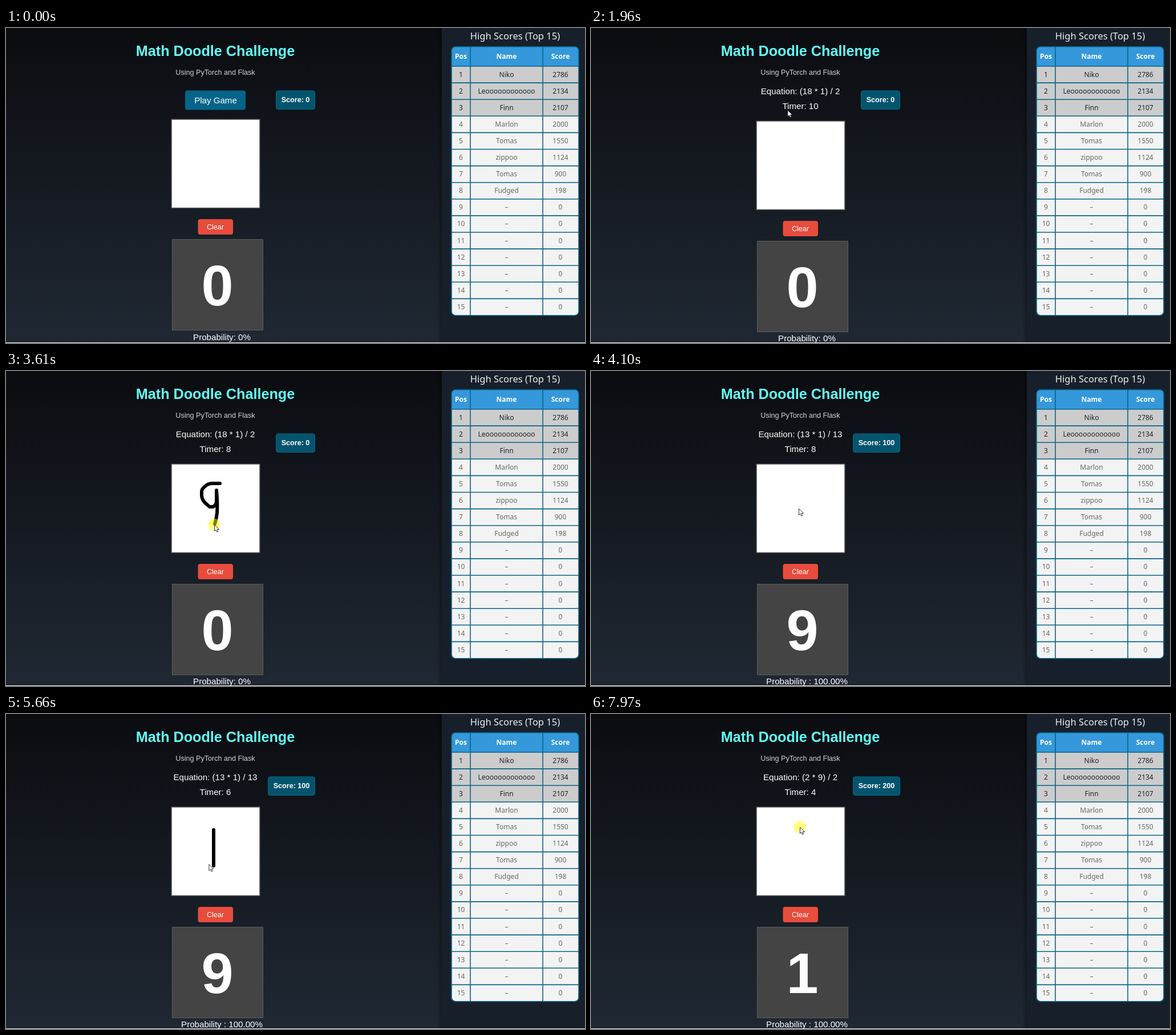
Animation, 1015 px wide and 552 px high, one loop 8 s. Source, as an HTML page:

```html
<!DOCTYPE html>
<html lang="en">
<head>
<meta charset="utf-8">
<title>Math Doodle Challenge</title>
<style>
  html, body { margin: 0; height: 100%; overflow: hidden; background: #0b0c10; }
  svg { display: block; width: 100%; height: 100%; }
  text { text-anchor: middle; fill: #fff; font: 15.12px "Liberation Sans", Arial, sans-serif; }
  .small { font-size: 12.6px; }
  .bold { font-weight: 700; }
  #table text, #boardTitle { font-family: "Noto Sans", "Open Sans", sans-serif; }
  #table text { font-size: 12px; }
  #table .top { fill: #1d242e; font-weight: 500; }
  #table .rest { fill: #686868; }
  #table .head { font-weight: 700; }
  .ink { fill: none; stroke: #000; stroke-width: 6; stroke-linecap: round; stroke-linejoin: round; stroke-dasharray: 1 1; }
</style>
</head>
<body>
<svg viewBox="0 0 1015 552" preserveAspectRatio="none">
  <defs>
    <linearGradient id="night" x2="0" y2="1">
      <stop stop-color="#0b0c10"/><stop offset="1" stop-color="#1f2833"/>
    </linearGradient>
    <linearGradient id="shade">
      <stop stop-color="#000" stop-opacity="0"/><stop offset="1" stop-color="#000" stop-opacity=".3"/>
    </linearGradient>
    <clipPath id="rounded"><rect x="781" y="32.5" width="223" height="471.5" rx="7"/></clipPath>
  </defs>
  <rect width="1015" height="552" fill="url(#night)"/>
  <rect x="756" width="8" height="552" fill="url(#shade)"/>
  <rect x="764" width="251" height="552" fill="#17202a"/>

  <text id="boardTitle" x="892.5" y="19.5" style="font-size:16.5px;fill:#eef0f2">High Scores (Top 15)</text>
  <g id="table" clip-path="url(#rounded)"></g>
  <rect x="781" y="32.7" width="223" height="471" rx="7" fill="none" stroke="#096487" stroke-width="1.6"/>

  <text class="bold" x="367" y="49" style="font-size:25.2px;fill:#62fdf8">Math Doodle Challenge</text>
  <text class="small" x="367" y="82" style="fill:#d2d3d4">Using PyTorch and Flask</text>

  <g id="play">
    <rect id="playBox" x="314" y="109.5" width="106" height="34" rx="4"/>
    <text x="367.5" y="131.5">Play Game</text>
  </g>
  <g id="quiz">
    <text id="equation" x="367" y="116"></text>
    <text id="timer" x="367" y="142"></text>
  </g>
  <rect id="scoreBox" y="110" height="32.5" rx="3.5" fill="#04546e" stroke="#0a6687"/>
  <text id="score" class="small bold" y="130"></text>

  <g id="lower">
    <rect x="290" y="160" width="155" height="155.5" fill="#fff" stroke="#4a4a4c" stroke-width="1.5"/>
    <rect x="336.5" y="335" width="61.5" height="27" rx="4" fill="#e74c3c"/>
    <text class="small" x="367" y="353">Clear</text>
    <rect x="291.5" y="370.5" width="159" height="159" fill="#444" stroke="#5c5c5a"/>
    <text id="digit" class="bold" x="370.5" y="485.5" style="font-size:100.8px"></text>
  </g>
  <text id="probability" x="378.5"></text>

  <path id="nine" class="ink" pathLength="1" d="M375 197H362Q354 197 349 202Q343 207 343 211V219Q344 226 349 231L357 238H363Q369 235 369 228V209Q371 230 370 248Q369 258 366 268"/>
  <path id="one" class="ink" pathLength="1" d="M364 203V266"/>

  <g id="pointer">
    <circle id="halo" r="10.5" fill="#ff0" opacity=".5"/>
    <path id="arrow" d="M.5 .5V11.5L3 9.2L4.8 13.2L6.8 12.3L5 8.5H8.5Z" fill="#fff" stroke="#222" stroke-width=".9"/>
    <path id="hand" d="M-.5 1.5Q1 -.2 2.4 1.5V6L7 7.2Q8.4 8 8 10L6.7 15.5H.2L-3.6 10.2Q-4 8.4 -2.2 8.6L-.5 10Z" fill="#fff" stroke="#222" stroke-width=".8"/>
  </g>
  <rect y="551" width="1015" height="1" fill="#fff"/>
</svg>
<script>
const LOOP = 8000, START = 1500, TICK = 1015;
const $ = id => document.getElementById(id);
const clamp = v => Math.max(0, Math.min(1, v));
const show = (id, on) => $(id).style.display = on ? '' : 'none';
const write = (id, text) => { if ($(id).textContent !== text) $(id).textContent = text; };

function buildTable() {
  const leaders = [['Niko', 2786], ['Leoooooooooooo', 2134], ['Finn', 2107], ['Marlon', 2000],
    ['Tomas', 1550], ['zippoo', 1124], ['Tomas', 900], ['Fudged', 198]];
  const rowHeight = 29.1, firstRow = 67;
  const band = (y, h, fill) => `<rect x="780" y="${y}" width="225" height="${h}" fill="${fill}"/>`;
  const cells = (values, y, kind) => values.map((value, i) =>
    `<text class="${kind}" x="${[797.5, 877.5, 972][i]}" y="${y}">${value}</text>`).join('');
  let html = band(32, 35, '#3498db') + cells(['Pos', 'Name', 'Score'], 54, 'head');
  let lines = 'M814 32V505M941 32V505';
  for (let i = 0; i < 15; i++) {
    const y = firstRow + i * rowHeight, top = i < 3;
    html += band(y, rowHeight + 1, top ? '#ccc' : '#f3f3f3');
    html += cells([i + 1, ...(leaders[i] || ['–', 0])], y + 18.5, top ? 'top' : 'rest');
    lines += `M780 ${y}H1005`;
  }
  $('table').innerHTML = html + `<path d="${lines}" stroke="#096487" stroke-width="1.6"/>`;
}

// Pointer waypoints: time, x, y
const route = [[0, 990, 562], [70, 966, 545], [320, 780, 405], [560, 530, 225], [810, 385, 138],
  [1090, 334, 127], [1820, 334, 127], [2200, 362, 172], [2570, 373, 196], [2790, 374, 198],
  [3600, 365, 269], [3820, 365, 269], [4370, 363, 214], [4550, 363, 203], [4990, 363, 204],
  [5590, 363, 267], [5660, 357, 263], [5720, 257, 268], [5800, 200, 274], [5870, 178, 276],
  [6060, 182, 274], [6460, 372, 231], [6600, 372, 230], [6950, 346, 208], [7370, 367, 200],
  [7630, 367, 199], [7700, 366, 198], [8000, 366, 198]];
const strokes = [
  { id: 'nine', from: 2790, to: 3600, cleared: 3820 },
  { id: 'one', from: 4990, to: 5590, cleared: 5800 }];
const presses = [[1290, 1490], [2770, 3680], [4950, 5640], [7970, 8000]];

function pointerAt(t) {
  const i = route.findIndex(p => p[0] > t);
  const [t0, x0, y0] = route[i - 1], [t1, x1, y1] = route[i];
  const k = (t - t0) / (t1 - t0);
  return [x0 + (x1 - x0) * k, y0 + (y1 - y0) * k];
}

function render(t) {
  const playing = t >= START;
  show('play', !playing);
  show('quiz', playing);
  const hover = clamp((t - 740) / 300);
  $('playBox').setAttribute('fill', `rgb(5,${100 - 22 * hover},${135 - 33 * hover})`);
  $('lower').setAttribute('transform', `translate(0 ${playing ? 3 : 0})`);

  write('equation', 'Equation: ' + (t < 3820 ? '(18 * 1) / 2' : t < 5800 ? '(13 * 1) / 13' : '(2 * 9) / 2'));
  write('timer', 'Timer: ' + (10 - Math.floor((t - START) / TICK)));

  const solved = (t >= 3750) + (t >= 5720);
  const left = solved ? 459.5 : 473.5;
  $('scoreBox').setAttribute('x', left);
  $('scoreBox').setAttribute('width', 541.5 - left);
  $('score').setAttribute('x', (left + 541.5) / 2);
  write('score', 'Score: ' + solved * 100);
  write('digit', '091'[solved]);
  write('probability', solved ? 'Probability : 100.00%' : 'Probability: 0%');
  $('probability').setAttribute('y', playing ? 548.5 : 546.5);

  let [x, y] = pointerAt(t);
  for (const { id, from, to, cleared } of strokes) {
    const path = $(id), progress = clamp((t - from) / (to - from));
    show(id, t > from && t < cleared);
    path.style.strokeDashoffset = 1 - progress;
    if (t > from && t < to) {
      const tip = path.getPointAtLength(progress * path.getTotalLength());
      [x, y] = [tip.x - 1, tip.y + 1];
    }
  }
  $('pointer').setAttribute('transform', `translate(${x} ${y})`);
  const overButton = !playing && x > 314 && x < 420 && y < 144;
  show('hand', overButton);
  show('arrow', !overButton);
  show('halo', presses.some(([from, to]) => t >= from && t < to));
}

buildTable();
const begin = performance.now();
function frame() {
  render((performance.now() - begin) % LOOP);
  requestAnimationFrame(frame);
}
frame();
</script>
</body>
</html>
```
